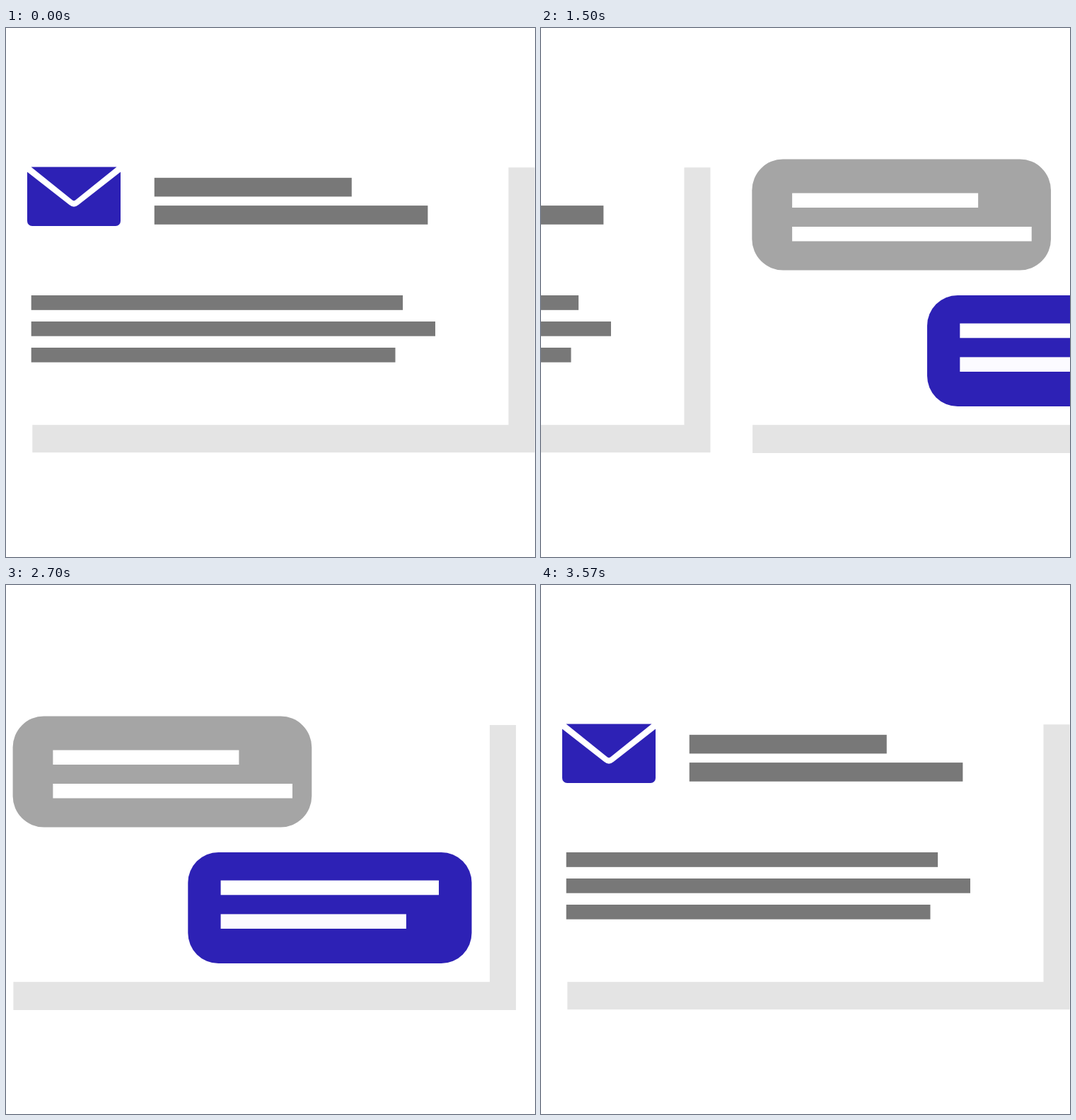
These frames come from a looping animation (748x748 px, 3600 ms). An HTML page:

```html
<!DOCTYPE html>
<html lang="en">
<head>
<meta charset="utf-8">
<title>Mail and chat</title>
<style>
  html, body { margin: 0; width: 100%; height: 100%; overflow: hidden; background: #fff; }
  svg { display: block; width: 748px; height: 748px; }
  .shadow { fill: #e4e4e4; }
  .accent { fill: #2d21b5; }
  .reply { fill: #a5a5a5; }
  .line { fill: #787878; }
  .text { fill: #fff; }
</style>
</head>
<body>
<svg viewBox="0 0 748 748">
  <g id="mail">
    <path class="shadow" d="M710.5 197.3H747.5V600.2H37.3V561.2H710.5Z"/>
    <g class="accent">
      <path d="M35.5 196.5H156.5L98 243.5Q96 245 94 243.5Z"/>
      <path d="M30 203.5L89.5 250Q96 255.3 102.5 250L162 203.5V273a7 7 0 0 1-7 7H37a7 7 0 0 1-7-7Z"/>
    </g>
    <g class="line">
      <rect x="209.8" y="211.8" width="279" height="26.6"/>
      <rect x="209.8" y="251.1" width="386.6" height="26.7"/>
      <rect x="35.7" y="378" width="525.4" height="20.8"/>
      <rect x="35.7" y="415" width="571.3" height="20.7"/>
      <rect x="35.7" y="452" width="514.8" height="20.7"/>
    </g>
  </g>
  <g id="chat">
    <path class="shadow" d="M709.4 198H746.5V601H35.8V561.2H709.4Z"/>
    <rect class="reply" x="35" y="185.5" width="422.7" height="157" rx="44"/>
    <rect class="accent" x="282.7" y="378" width="401.2" height="157" rx="43"/>
    <g class="text">
      <rect x="91.8" y="233.5" width="263" height="20.5"/>
      <rect x="91.8" y="281" width="338.6" height="20.5"/>
      <rect x="329" y="417.7" width="308.4" height="20.6"/>
      <rect x="329" y="465.4" width="262.3" height="20.6" fill="#fcfbff"/>
    </g>
  </g>
</svg>
<script>
  const LOOP = 3600, TICK = 30, SLIDE_TICKS = 30, EXIT = 762;
  const mail = { node: document.getElementById('mail'), entry: 783 };
  const chat = { node: document.getElementById('chat'), entry: 790 };

  const place = (panel, x) => panel.node.setAttribute('transform', `translate(${x} 0)`);

  // The leaving panel exits left while the next one slides in from the right.
  function slide(from, to, progress) {
    place(from, -EXIT * progress);
    place(to, to.entry * (1 - progress));
  }

  function draw(now) {
    const tick = Math.floor((now % LOOP) / TICK);
    const progress = start => Math.min(1, Math.max(0, (tick - start) / SLIDE_TICKS));
    if (tick < 90) slide(mail, chat, progress(30));
    else slide(chat, mail, progress(89));
    requestAnimationFrame(draw);
  }
  draw(0);
</script>
</body>
</html>
```
